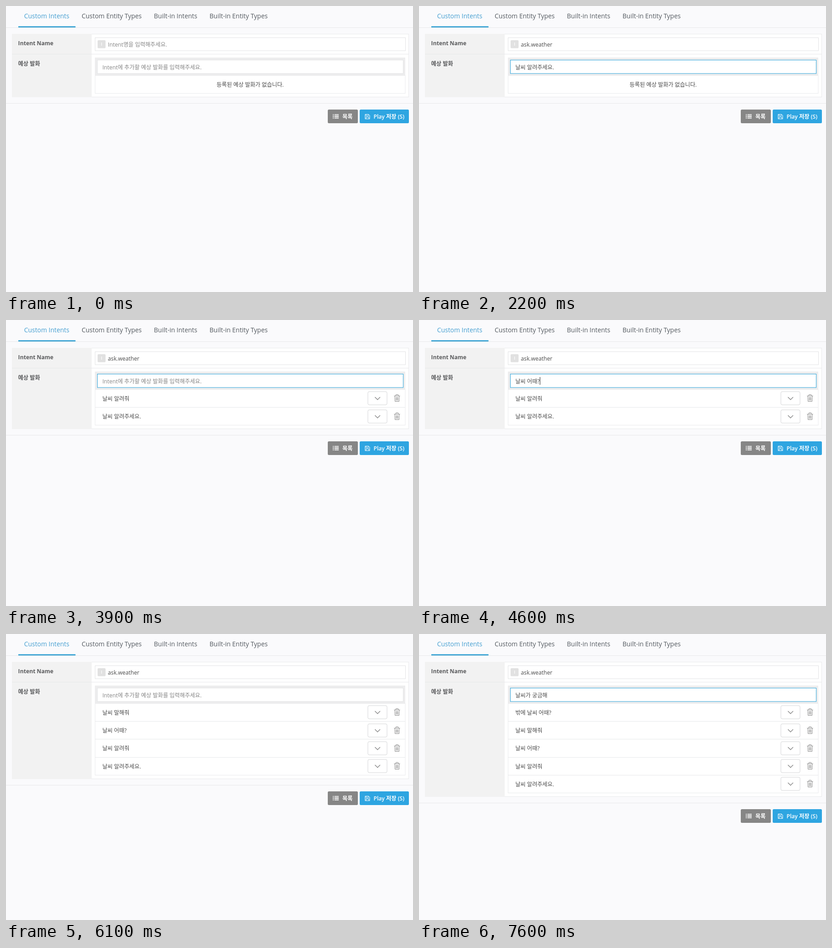
Recreate the animation shown at these times as an HTML page. Size 893x627 px, loop 8000 ms.

```html
<!DOCTYPE html>
<html lang="ko">
<head>
<meta charset="utf-8">
<title>Custom Intents</title>
<style>
  html, body { margin: 0; width: 100%; height: 100%; overflow: hidden; background: #fafafc; }
  svg { display: block; }
  text { font: 12.2px "Open Sans", "Noto Sans CJK KR", "Noto Sans CJK", sans-serif; fill: #4a4a4a; white-space: pre; }
  .tab { font-size: 13.94px; fill: #555b61; }
  .tab.on { fill: #459fd1; }
  .label { font-weight: 700; fill: #5a5b5d; }
  .hint { fill: #858585; }
  .btn { font-weight: 600; fill: #fff; }
  .line { fill: #e7e8ea; }
  .box { fill: #fff; stroke: #e2e3e5; }
  .focus { stroke: #2ba4da; }
  .icon { fill: none; stroke: #8a8a8a; }
</style>
</head>
<body>
<svg width="893" height="627" viewBox="0 0 893 627">
  <defs>
    <g id="tools">
      <rect x="794" y="5" width="42" height="29" rx="3" fill="#fff" stroke="#d4d5d7"/>
      <path class="icon" d="M809.5 17l5.7 5.7 5.7-5.7" stroke-width="1.5"/>
      <path class="icon" d="M851.5 14.5h13M855.5 14v-2.5h5v2.5M853 14.5l.6 12h8.8l.6-12M856 17v7.5M858 17v7.5M860 17v7.5"/>
    </g>
  </defs>

  <text class="tab on" x="39.7" y="27">Custom Intents</text>
  <text class="tab" x="166" y="27">Custom Entity Types</text>
  <text class="tab" x="324.6" y="27">Built-in Intents</text>
  <text class="tab" x="446.6" y="27">Built-in Entity Types</text>
  <rect class="line" y="47" width="893" height="1"/>
  <rect x="27" y="44.4" width="125.5" height="2.6" fill="#2f9fd2"/>

  <rect id="panel" class="box" x="13.5" y="61.5" width="870" style="stroke:#e9eaec"/>
  <rect id="side" x="13" y="61" width="175" fill="#f2f2f2"/>
  <rect class="line" x="13" y="105" width="871" height="1"/>
  <text class="label" x="26.6" y="86">Intent Name</text>
  <text class="label" x="26.6" y="131">예상 발화</text>

  <rect id="nameBox" class="box" x="195.5" y="69.5" width="681" height="28.5"/>
  <rect x="201" y="75" width="17.5" height="17.5" rx="2" fill="#e1e1e1"/>
  <text class="btn" x="209.8" y="87.3" text-anchor="middle" style="font-size:9.5px">I</text>
  <text id="name" x="223.6" y="88.6"></text>
  <rect id="nameCaret" y="76" width="1" height="16" fill="#222"/>

  <rect id="list" class="box" x="195.5" y="152.5" width="680.5" style="stroke:#e9eaec"/>
  <rect x="195" y="113" width="681" height="40" fill="#ededee"/>
  <rect id="inputBox" x="200.5" y="118.5" width="671" height="29.5"/>
  <text id="input" x="211.4" y="138.6"></text>
  <rect id="caret" y="125" width="1" height="17" fill="#222"/>
  <g id="rows"></g>

  <g id="foot">
    <rect class="line" y="213" width="893" height="1"/>
    <rect x="706" y="227" width="66" height="30" rx="2.5" fill="#868686"/>
    <path d="M717 238.1h2m1.6 0h9.4M717 240.7h2m1.6 0h9.4M717 243.3h2m1.6 0h9.4M717 245.9h2m1.6 0h9.4" stroke="#fff" stroke-width="1.5"/>
    <text class="btn" x="738" y="246.8">목록</text>
    <rect x="776" y="227" width="108" height="30" rx="2.5" fill="#2ea5e1"/>
    <path d="M788 237.5h7.5l2.5 2.5v7.5h-10zM790 237.5v3.4h5v-3.4M790 247.5v-4h6v4" fill="none" stroke="#fff"/>
    <text class="btn" x="806.4" y="246.8">Play 저장 (S)</text>
  </g>
</svg>
<script>
const $ = id => document.getElementById(id);
const LOOP = 8000, PITCH = 39.2;
const NAME_HINT = 'Intent명을 입력해주세요.';
const INPUT_HINT = 'Intent에 추가할 예상 발화를 입력해주세요.';
const NAME = 'ask.weather';
const SAID = ['날씨 알려주세요.', '날씨 알려줘', '날씨 어때?', '날씨 말해줘', '밖에 날씨 어때?', '날씨가 궁금해'];

// [start ms, name, typed text, rows, focused field, caret shown]
const STEPS = [
  [0, '', '', 0, '', 0],
  [500, 'ask.', '', 0, 'name', 1],
  [1000, NAME, '', 0, 'name', 1],
  [1500, NAME, '', 0, 'input', 1],
  [2000, NAME, '날', 0, 'input', 0],
  [2200, NAME, SAID[0], 0, 'input', 0],
  [2700, NAME, '', 1, 'input', 0],
  [3200, NAME, '날씨 ', 1, 'input', 1],
  [3400, NAME, SAID[1], 1, 'input', 1],
  [3900, NAME, '', 2, 'input', 0],
  [4400, NAME, '날씨 ', 2, 'input', 1],
  [4600, NAME, SAID[2], 2, 'input', 1],
  [5100, NAME, '', 3, 'input', 1],
  [5600, NAME, SAID[3], 3, 'input', 0],
  [6100, NAME, '', 4, '', 0],
  [6600, NAME, SAID[4], 4, 'input', 1],
  [7100, NAME, '', 5, 'input', 0],
  [7600, NAME, SAID[5], 5, 'input', 0]
];

function field(el, caret, value, hint, showCaret) {
  el.textContent = value || hint;
  el.setAttribute('class', value ? '' : 'hint');
  const width = value ? el.getComputedTextLength() : 0;
  caret.setAttribute('x', Math.round(+el.getAttribute('x') + width));
  caret.style.display = showCaret ? '' : 'none';
}

function row(text, i) {
  const y = 152.5 + i * PITCH;
  const line = i ? `<rect class="line" x="195" y="${Math.round(y - .5)}" width="681" height="1"/>` : '';
  return `${line}<text x="211.4" y="${y + 24.5}">${text}</text><use href="#tools" y="${Math.round(y - .1)}"/>`;
}

function render([, name, typed, count, focus, caret]) {
  field($('name'), $('nameCaret'), name, NAME_HINT, caret && focus === 'name');
  field($('input'), $('caret'), typed, INPUT_HINT, caret && focus === 'input');
  $('nameBox').setAttribute('class', focus === 'name' ? 'box focus' : 'box');
  $('inputBox').setAttribute('class', focus === 'input' ? 'box focus' : 'box');

  $('rows').innerHTML = count
    ? SAID.slice(0, count).reverse().map(row).join('')
    : '<text x="535.7" y="177" text-anchor="middle">등록된 예상 발화가 없습니다.</text>';

  const grow = Math.round(Math.max(0, count - 1) * PITCH);
  $('panel').setAttribute('height', 138 + grow);
  $('side').setAttribute('height', 139 + grow);
  $('list').setAttribute('height', 39 + grow);
  $('foot').setAttribute('transform', `translate(0 ${grow})`);
}

let shown;
function tick() {
  const t = performance.now() % LOOP;
  const step = STEPS.findLast(s => s[0] <= t);
  if (step !== shown) render(shown = step);
  requestAnimationFrame(tick);
}
tick();
</script>
</body>
</html>
```
